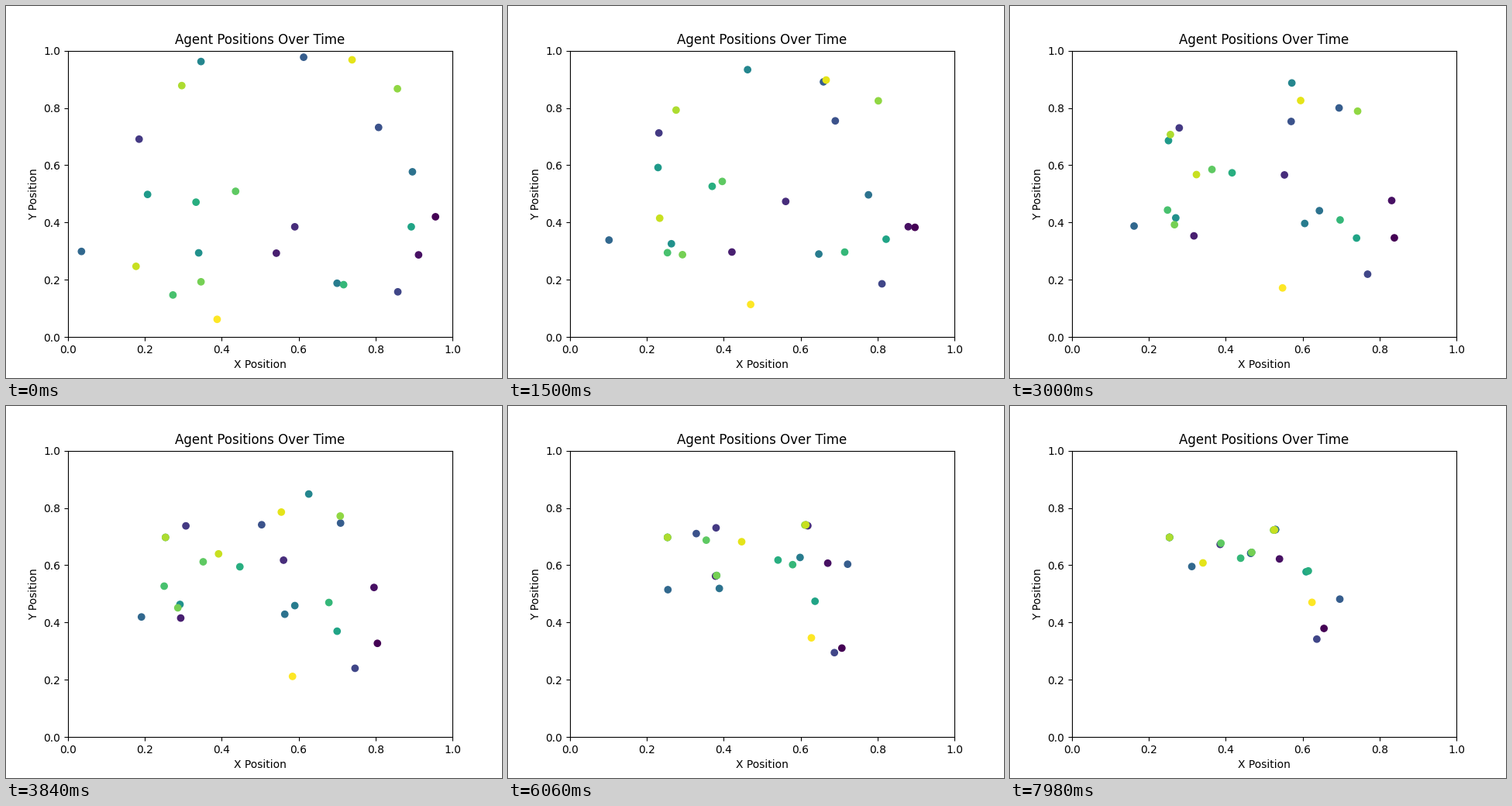
A matplotlib script for the animation above (8 s loop, 640 by 480 pixels).

```python
import numpy as np
import matplotlib.pyplot as plt
from matplotlib.animation import FuncAnimation

TICK = 20          # ms per drawn frame
HOLD = 3           # drawn frames per simulation step
FRAMES = 400

# Where each agent starts, whom it chases and how far it goes per step
START = np.array([
    (0.956, 0.420), (0.912, 0.287), (0.542, 0.293), (0.590, 0.385), (0.185, 0.691),
    (0.858, 0.158), (0.808, 0.732), (0.613, 0.977), (0.035, 0.299), (0.896, 0.577),
    (0.700, 0.188), (0.346, 0.962), (0.340, 0.294), (0.207, 0.498), (0.893, 0.385),
    (0.333, 0.471), (0.717, 0.183), (0.273, 0.147), (0.436, 0.509), (0.346, 0.193),
    (0.857, 0.867), (0.296, 0.878), (0.177, 0.247), (0.739, 0.968), (0.388, 0.062),
])
QUARRY = [24, 23, 12, 11, 23, 13, 21, 0, 18, 2, 3, 20, 22,
          21, 10, 7, 23, 13, 4, 12, 18, 13, 11, 8, 14]
PACE = np.array([277, 414, 484, 373, 204, 217, 481, 391, 310, 577, 459, 478, 369,
                 386, 335, 266, 455, 596, 211, 444, 277, 351, 710, 405, 388]) / 1e5


def simulate(steps):
    """Agents move in turn, straight at their quarry, never past it."""
    pos = START.copy()
    path = [pos.copy()]
    for _ in range(steps):
        for i, (q, pace) in enumerate(zip(QUARRY, PACE)):
            gap = pos[q] - pos[i]
            dist = np.hypot(*gap)
            pos[i] += gap * (pace / dist if dist > pace else 1)
        path.append(pos.copy())
    return path


path = simulate((FRAMES - 1) // HOLD)

fig, ax = plt.subplots(figsize=(6.4, 4.8), dpi=100)
dots = ax.scatter(*START.T, c=np.arange(len(START)), cmap="viridis")
ax.set(xlim=(0, 1), ylim=(0, 1), title="Agent Positions Over Time",
       xlabel="X Position", ylabel="Y Position")


def update(i):
    dots.set_offsets(path[i // HOLD])
    return dots,


anim = FuncAnimation(fig, update, frames=FRAMES, interval=TICK,
                     repeat=True, repeat_delay=0)
plt.show()
```
